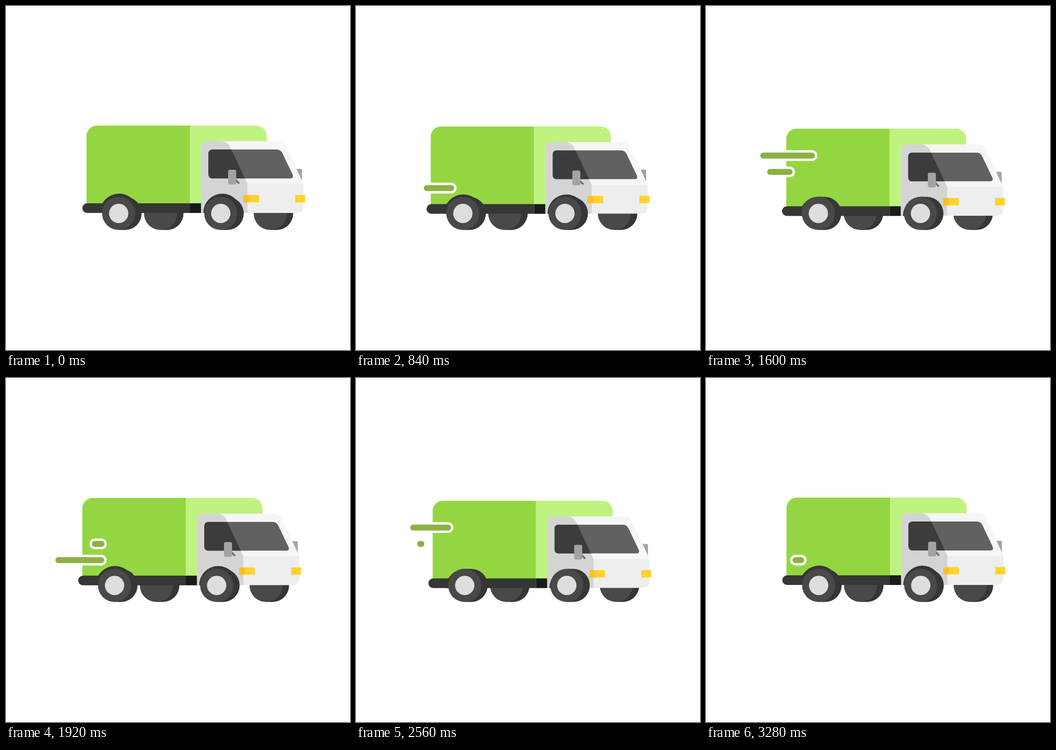
These frames come from a looping animation (748x748 px, 3320 ms). An HTML page:

```html
<!DOCTYPE html>
<html lang="en">
<head>
<meta charset="utf-8">
<title>Delivery truck</title>
<style>
  html, body { margin: 0; width: 100%; height: 100%; overflow: hidden; background: #fff; }
  svg { display: block; width: 100vw; height: 100vh; }
  .tire { fill: #494949; }
  .dark { fill: #363636; }
  .hub { fill: #dedede; }
  .mirror { fill: #a3a3a3; }
  .lamp { fill: #ffd22c; }
  #streaks path { fill: none; stroke-linecap: round; }
</style>
</head>
<body>
<svg viewBox="0 0 748 748">
  <defs>
    <clipPath id="box"><rect x="175" y="260" width="392" height="190" rx="23"/></clipPath>
    <clipPath id="cab">
      <path d="M424 450V310Q424 294 440 294H592Q604 294 609 305L645 383Q647 387 647 392V434Q647 450 631 450Z"/>
    </clipPath>
    <clipPath id="glass">
      <path d="M440 322Q440 312 450 312H588Q597 312 601 320L623 366Q627 375 617 375H450Q440 375 440 365Z"/>
    </clipPath>
  </defs>

  <g id="truck">
    <g id="farWheels"></g>
    <g id="body">
      <rect class="mirror" x="624" y="354" width="19.5" height="28" rx="3"/>
      <g clip-path="url(#box)">
        <path fill="#94d641" d="M175 260H400V440H175Z"/>
        <path fill="#bff37f" d="M400 260H567V430H400Z"/>
      </g>
      <path class="dark" d="M176.500 429H400V450H176.500A10.500 10.500 0 0 1 176.500 429Z"/>
      <path fill="#171b1d" d="M400 429H425V450H400Z"/>
      <g clip-path="url(#cab)">
        <path fill="#f6f6f6" d="M424 294H650V388H424Z"/>
        <path fill="#eee" d="M424 387H650V450H424Z"/>
        <path fill="#d4d4d4" d="M424 294H466Q482 294 488 308L525 387V450H424Z"/>
      </g>
      <g clip-path="url(#glass)">
        <path fill="#616161" d="M440 312H630V375H440Z"/>
        <path fill="#3c3c3c" d="M440 312H490L519.500 375H440Z"/>
      </g>
      <path d="M499 378L507 386" stroke="#6e6e6e" stroke-width="4"/>
      <rect class="mirror" x="483" y="356" width="17.500" height="32" rx="4"/>
      <path class="lamp" d="M516 411H550V427H516ZM629 411H650.500V427H629Z"/>
      <path fill="#ffbe26" d="M516 411H528V427H516Z"/>
      <path class="dark" d="M204 450A42 42 0 0 1 288 450ZM429 450A41.500 42 0 0 1 512 450Z"/>
    </g>
    <g id="nearWheels"></g>
  </g>
  <g id="streaks"></g>
</svg>

<script>
const LOOP = 3320, STEP = 40, REST = 3050;
const $ = id => document.getElementById(id);

function wheel(x, withHub) {
  return `<path class="dark" d="M${x} 415H${x + 14}A36 36 0 0 1 ${x + 14} 487H${x}Z"/>
    <circle class="tire" cx="${x}" cy="451" r="36"/>` +
    (withHub ? `<circle class="hub" cx="${x}" cy="451" r="21"/>` : "");
}
$("farWheels").innerHTML = wheel(336) + wheel(574.5);
$("nearWheels").innerHTML = wheel(245, true) + wheel(467, true);

// Truck sway: eases between front and back at these times.
const SWAY_KEYS = [0, 695, 1500, 2200, 3060], SWAY = 13.7;
const BOUNCE = 6.8, BOUNCE_TIME = 1015;

// Streaks grow leftwards, then their right ends follow.
const STREAKS = [
  { y: 396, left: 101.5, right: 207, delay: 0 },
  { y: 360.7, left: 141.5 - 2, right: 207.5, delay: 87 },
  { y: 325.3, left: 124.5, right: 230.5, delay: 174 }
];
const STARTS = [20, 340, 775, 1290, 1806, 2175, 2720, 3265];
const GROW = 129, TAIL_DELAY = 174;

$("streaks").innerHTML = STREAKS.map(() =>
  '<g><path stroke="#fff" stroke-width="23.5"/><path stroke="#8db144" stroke-width="13"/></g>').join("");
const streakNodes = [...$("streaks").children];

const clamp = v => Math.max(0, Math.min(1, v));
const ease = p => (1 - Math.cos(Math.PI * p)) / 2;

function swayAt(t) {
  const i = SWAY_KEYS.findIndex(key => key > t);
  if (i < 0) return 0;
  const from = SWAY_KEYS[i - 1];
  const p = ease((t - from) / (SWAY_KEYS[i] - from));
  return -SWAY * (i % 2 ? p : 1 - p);
}

function drawStreak(streak, node, t) {
  const start = STARTS.filter(s => s + streak.delay < t).pop();
  const age = start === undefined ? -1 : t - start - streak.delay;
  const head = clamp(age / GROW), tail = clamp((age - TAIL_DELAY) / GROW);
  const visible = age > 0 && tail < 1;
  node.style.display = visible ? "" : "none";
  if (!visible) return;
  const at = p => streak.right + (streak.left - streak.right) * p;
  // A tiny extra length keeps the round caps when both ends meet.
  for (const path of node.children) path.setAttribute("d", `M${at(head)} ${streak.y}H${at(tail) + 0.01}`);
}

function render(t) {
  const bounce = t < REST ? BOUNCE * ease(2 * t / BOUNCE_TIME) : 0;
  $("truck").setAttribute("transform", `translate(${swayAt(t)} 0)`);
  $("body").setAttribute("transform", `translate(0 ${bounce})`);
  STREAKS.forEach((streak, i) => drawStreak(streak, streakNodes[i], t));
}

let began;
function tick(now) {
  began ??= now;
  render(Math.floor(((now - began) % LOOP) / STEP) * STEP);
  requestAnimationFrame(tick);
}
render(0);
requestAnimationFrame(tick);
</script>
</body>
</html>
```
